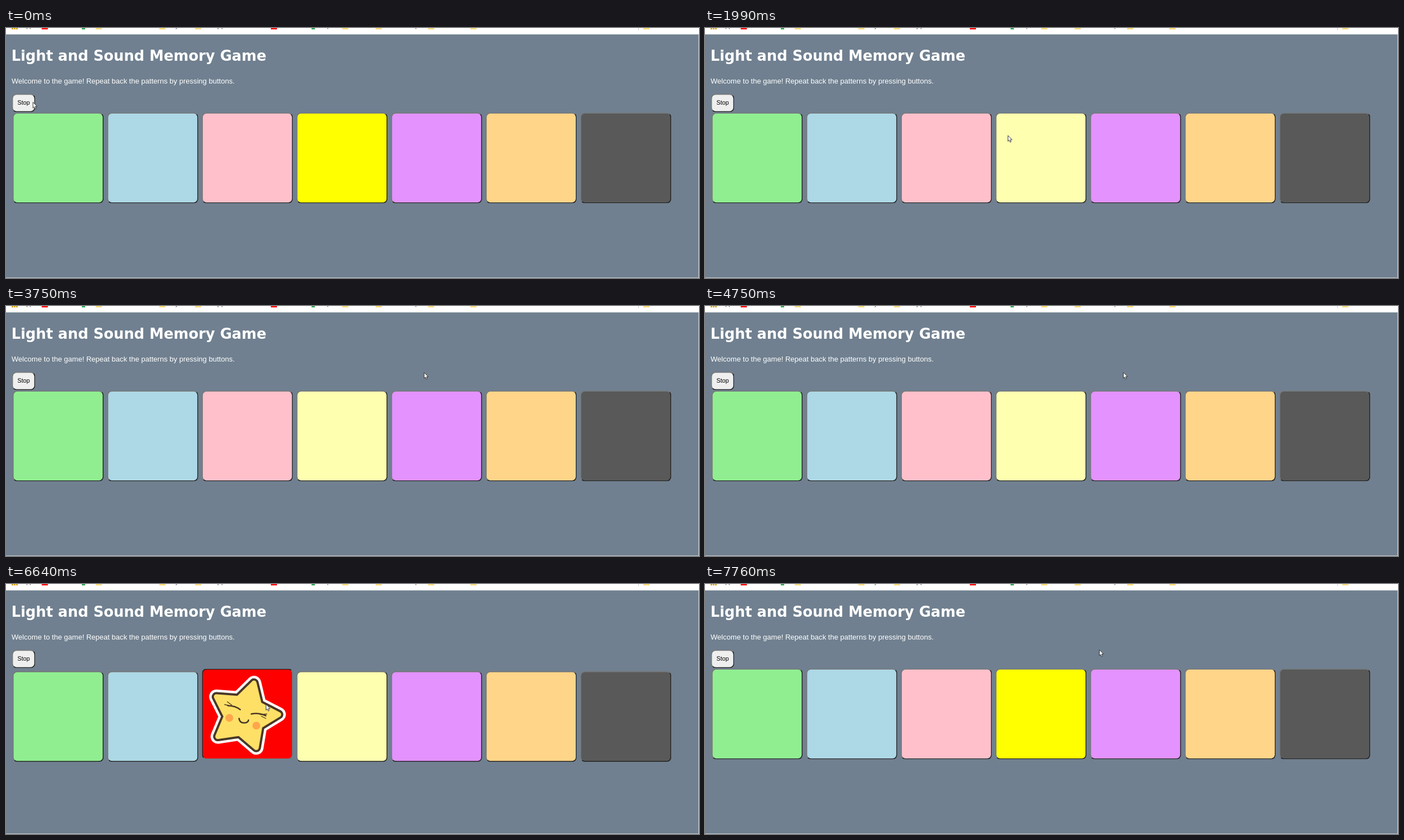
Animation of 1243x450 px, one loop 8 s. Source, as an HTML page:

```html
<!DOCTYPE html>
<html lang="en">
<head>
<meta charset="utf-8">
<title>Light and Sound Memory Game</title>
<style>
  html, body { margin: 0; width: 100%; height: 100%; overflow: hidden; background: #708090; }
  svg, .button { position: absolute; left: 0; top: 0; }
  .button {
    box-sizing: border-box; transform-origin: 0 0;
    border: 2px solid; border-color: #767676 #222 #222 #767676; border-radius: 10px;
  }
  .tile { width: 200px; height: 200px; }
  .pressed { border-color: #222 #767676 #767676 #222; }
  #stop {
    width: 51px; height: 40px; background: #efefef;
    font: 13.333px/36px "Liberation Sans", Arial, sans-serif; text-align: center;
  }
</style>
</head>
<body>
<svg width="1243" height="450">
  <rect width="1243" height="11.5" fill="#fff"/>
  <g id="bookmarks" font-family="Roboto, sans-serif" font-size="10" fill="#444"></g>
  <path d="M1134.5 0V4" stroke="#ccc"/>
  <path d="M1242.5 11V450M0 449.7H1243" stroke="#d5d9dd"/>
  <text x="9.8" y="59" font-family="DejaVu Sans, sans-serif" font-weight="bold" font-size="25.85" fill="#fff">Light and Sound Memory Game</text>
  <text x="10" y="100" font-family="Liberation Sans, Arial, sans-serif" font-size="13.05" fill="#fff">Welcome to the game! Repeat back the patterns by pressing buttons.</text>
</svg>
<div class="button" id="stop">Stop</div>
<svg id="overlay" width="1243" height="450">
  <defs><polygon id="star" stroke-linejoin="round"/></defs>
  <g id="sticker" transform="translate(428 237)">
    <use href="#star" fill="#fff" stroke="#fff" stroke-width="26"/>
    <use href="#star" fill="#4a3728" stroke="#4a3728" stroke-width="17"/>
    <use href="#star" fill="#ffe066" stroke="#ffe066" stroke-width="9"/>
    <g fill="#ffa64d"><circle cx="-27.5" cy="4" r="7"/><circle cx="21" cy="18" r="7"/></g>
    <g fill="none" stroke="#4a3728" stroke-linecap="round">
      <path stroke-width="2.6" d="M-10 5Q-9 13-1 13Q6 13 7 8M-30-18Q-17-18-8-11M12-3Q24-6 38 0"/>
      <path stroke-width="1.3" d="M-36-20L-27-18M-31-25L-23-19M28-2L40-3M30 1L38 5"/>
    </g>
  </g>
  <path id="cursor" fill="#fff" stroke="#222" stroke-width=".9" d="M.4.6V11L2.7 8.8 4.3 12.6 6.1 11.8 4.5 8.1H7.8Z"/>
</svg>
<script>
const LOOP = 8000, STEP = 120, YELLOW = 3, PINK = 2;
const $ = id => document.getElementById(id);
const place = (button, x, y) => button.style.transform = `translate(${x}px, ${y}px) scale(.8156)`;

// Lower edges of the bookmark icons and labels
const icon = (x, color, width = 11) => `<rect x="${x}" width="${width}" height="2.5" fill="${color}"/>`;
const label = (x, text) => `<text x="${x}" y="0.4">${text}</text>`;
$('bookmarks').innerHTML =
  [161, 275, 339, 603, 663, 757, 833, 1143].map(x => icon(x, '#f9dc78')).join('') +
  [10, 14, 18].map(x => icon(x, '#d9a520', 3)).join('') +
  [64, 475].map(x => icon(x, '#f00')).join('') +
  [136, 548].map(x => icon(x, '#34a853', 6)).join('') +
  label(30, 'Apps') + label(304, 'y') + label(379, 'y p') + label(576, 'p') + label(734, 'p');

$('star').setAttribute('points', Array.from({ length: 10 }, (_, i) => {
  const angle = (36 * i - 2) * Math.PI / 180, radius = i % 2 ? 33 : 61;
  return [radius * Math.cos(angle), radius * Math.sin(angle)];
}).join(' '));

const colors = ['#90ee90', '#add8e6', '#ffc0cb', '#ffffb0', '#e392fe', '#ffd589', '#595959'];
const litColors = { [YELLOW]: '#ff0', [PINK]: '#f00' };
const tiles = colors.map(() => {
  const tile = document.createElement('div');
  document.body.insertBefore(tile, $('overlay'));
  return tile;
});
place($('stop'), 10.8, 118.7);

// A light stays on for 870 ms, a press for one step
const lights = [[YELLOW, -750], [YELLOW, 2620], [PINK, 3870], [YELLOW, 7760]];
const presses = [[YELLOW, 1500], [YELLOW, 6160], [PINK, 6640]];
const activeTile = (starts, duration, time) =>
  starts.find(([, start]) => time >= start && time < start + duration)?.[0];

// Pointer moves: start, end, x, y of the place reached
const moves = [
  [870, 990, 417, 164], [1140, 1380, 533, 187], [1990, 1990, 543, 193],
  [2760, 3240, 744, 122], [3490, 3990, 750, 119], [5410, 5770, 638, 206],
  [6400, 6640, 466, 216], [6880, 6880, 475, 212], [7000, 7260, 707, 118]
];

// Eased out, in whole steps
function progress(time, start, end) {
  if (time < start) return 0;
  const done = Math.floor((time - start) / STEP) + 1;
  const total = Math.round((end - start) / STEP) + 1;
  return 1 - (1 - Math.min(1, done / total)) ** 3;
}

function pointerAt(time) {
  return moves.reduce(([x, y], [start, end, toX, toY]) => {
    const p = progress(time, start, end);
    return [x + (toX - x) * p, y + (toY - y) * p];
  }, [48, 133]);
}

function draw(time) {
  const lit = activeTile(lights, 870, time), pressed = activeTile(presses, STEP, time);
  tiles.forEach((tile, i) => {
    const shifted = pressed !== undefined && i !== pressed;
    tile.className = 'button tile' + (i === pressed ? ' pressed' : '');
    tile.style.background = i === lit || i === pressed ? litColors[i] : colors[i];
    place(tile, 12 + 169.7 * i, shifted ? 157 : 152.4);
  });
  $('sticker').style.display = pressed === PINK ? '' : 'none';
  $('cursor').setAttribute('transform', `translate(${pointerAt(time)})`);
}

const start = performance.now();
function tick() {
  draw((performance.now() - start) % LOOP);
  requestAnimationFrame(tick);
}
tick();
</script>
</body>
</html>
```
